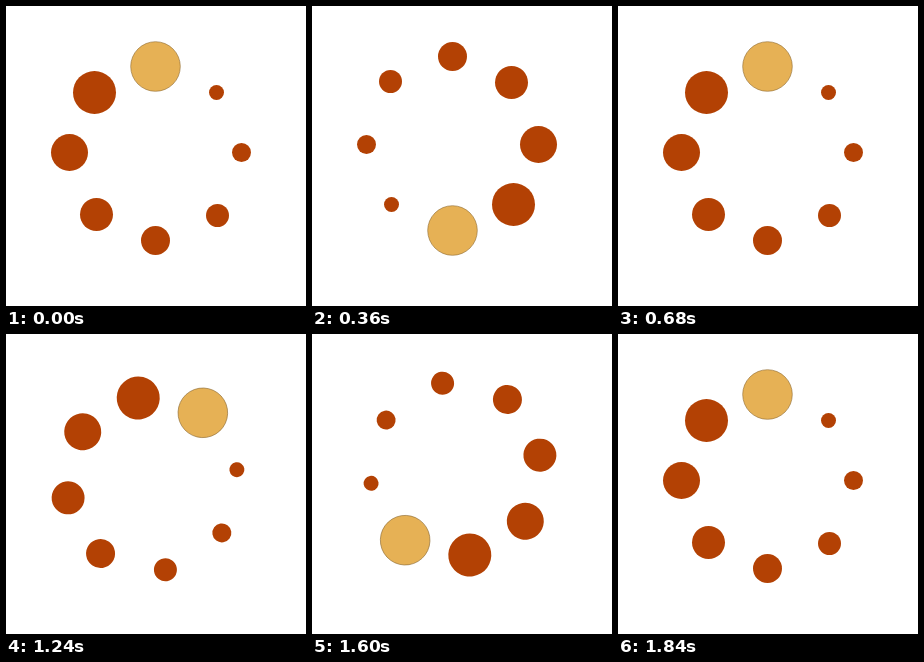
Write an HTML page that moves like this. It is 300 px wide and 300 px high and loops after 2000 ms.

```html
<!DOCTYPE html>
<html lang="en">
<head>
<meta charset="utf-8">
<title>Dot spinner</title>
<style>
  html, body { margin: 0; width: 100%; height: 100%; overflow: hidden; background: #fff; }
  svg { display: block; width: 100%; height: 100%; }
  .dot { fill: #b34104; }
  .lead { fill: #e6b155; stroke: #8f6c35; stroke-width: .6; }
</style>
</head>
<body>
<svg viewBox="0 0 300 300">
  <g id="ring">
    <circle class="lead" cx="149.5" cy="60.5" r="24.8"/>
    <circle class="dot" cx="88.5" cy="86.5" r="21.5"/>
    <circle class="dot" cx="63.5" cy="146.5" r="18.5"/>
    <circle class="dot" cx="90.5" cy="208.5" r="16.5"/>
    <circle class="dot" cx="149.5" cy="234.5" r="14.5"/>
    <circle class="dot" cx="211.5" cy="209.5" r="11.5"/>
    <circle class="dot" cx="235.5" cy="146.5" r="9.5"/>
    <circle class="dot" cx="210.5" cy="86.5" r="7.5"/>
  </g>
</svg>
<script>
  const LOOP = 2000, TICK = 40;
  // One turn is 20 steps of 18 degrees at 30 per second, then a rest up to step 35.
  const STEP = 1000 / 30, TURN = 20, CYCLE = 35;
  const ring = document.getElementById('ring');

  function angleAt(ms) {
    const t = Math.floor((ms % LOOP) / TICK) * TICK;
    const step = Math.floor(Math.max(0, t - 1) / STEP) % CYCLE;
    return Math.min(step, TURN) % TURN * 360 / TURN;
  }

  function draw() {
    ring.setAttribute('transform', `rotate(${angleAt(performance.now())} 145 142.5)`);
    requestAnimationFrame(draw);
  }
  draw();
</script>
</body>
</html>
```
